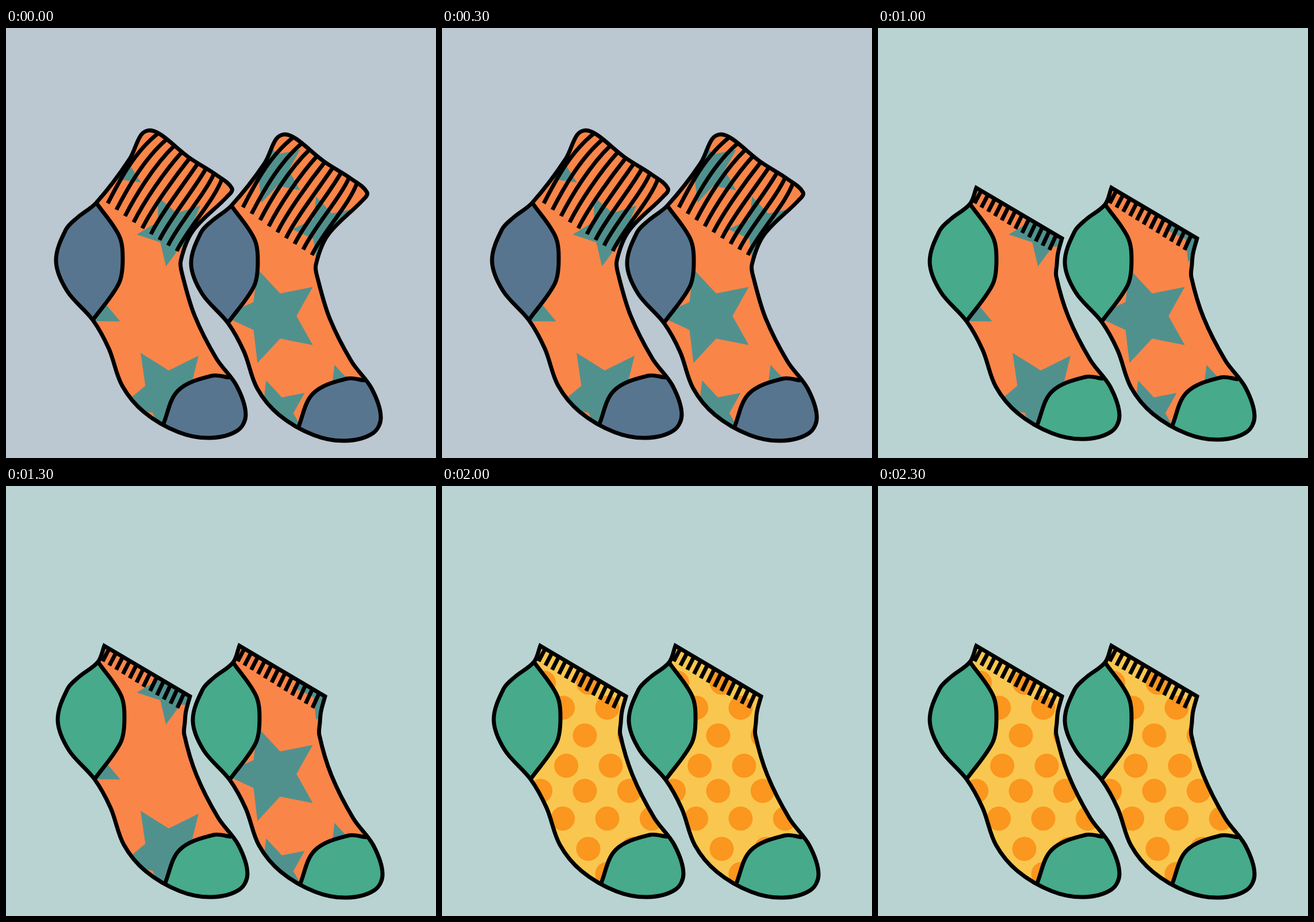
An HTML page with a canvas for the animation above (2500 ms loop, 748x748 px).

```html
<!DOCTYPE html>
<html lang="en">
<head>
<meta charset="utf-8">
<title>Socks</title>
<style>
html, body { margin: 0; height: 100%; overflow: hidden; }
canvas { display: block; }
</style>
</head>
<body>
<canvas id="stage" width="748" height="748"></canvas>
<script>
const ctx = document.getElementById('stage').getContext('2d');
const TAU = Math.PI * 2, RAD = Math.PI / 180;
const BLUE = '#58758f', ORANGE = '#fa8549', TEAL = '#50918e', MINT = '#46aa8b';
const CREAM = '#f3e9d8', GREEN = '#3f7c54', RED = '#ff6238', CRIMSON = '#b90b0d';

const mix = (a, b, u) => a + (b - a) * u;
const points = text => text.split(' ').map(p => p.split(',').map(Number));
const shift = (list, dx, dy) => list.map(([x, y]) => [x + dx, y + dy]);

// Smooth curve through points; a doubled point makes a sharp corner.
function spline(list, closed) {
  const path = new Path2D(), n = list.length;
  const at = i => closed ? list[(i + n) % n] : list[Math.max(0, Math.min(n - 1, i))];
  const tangent = (i, len) => {
    const [ax, ay] = at(i - 1), [bx, by] = at(i + 1);
    const k = len / 3 / (Math.hypot(bx - ax, by - ay) || 1);
    return [(bx - ax) * k, (by - ay) * k];
  };
  path.moveTo(...list[0]);
  for (let i = 0; i < (closed ? n : n - 1); i++) {
    const [x, y] = at(i), [u, v] = at(i + 1), len = Math.hypot(u - x, v - y);
    const a = tangent(i, len), b = tangent(i + 1, len);
    path.bezierCurveTo(x + a[0], y + a[1], u - b[0], v - b[1], u, v);
  }
  if (closed) path.closePath();
  return path;
}

// ---- Sock shapes ----
const foot = points('157,304 124,330 104,351 87,405 106,457 151,508 179,558 202,622 240,668 300,703 355,713 403,700 417,672 401,622 366,575 328,500 307,430');
const heel = points('157,304 197,362 203,405 196,445 151,508');
const toe = points('273,691 299,631 358,605 389,608');

// Ribs run from the top edge to a lower edge: [first end, last end, sag].
// lean: sideways pull at top and bottom, for the first and last rib.
const cuffs = {
  mid: {
    top: points('304,405 325,353 385,293 393,279 365,255 318,225 270,186 250,178 235,186 215,228'),
    footShift: [0, 0], rightDrop: [7, 5], ribs: 9,
    from: [[265, 183], [376, 261], 3], to: [[177, 305], [297, 388], 2],
    lean: [[44, 11], [18, 16]]
  },
  tall: {
    top: points('303,402 307,370 334,300 352,237 398,162 428,103 387,77 345,69 258,40 232,35 220,44 196,165 162,270'),
    footShift: [0, 0], rightDrop: [0, 5], ribs: 10,
    from: [[245, 37], [408, 84], 4], to: [[171, 277], [305, 344], -9],
    lean: [[18, 28], [2, 18]]
  },
  short: {
    top: points('311,412 313,392 320,366 320,366 171,278 171,278'),
    footShift: [3, 2], rightDrop: [0, 1], ribs: 12,
    from: [[179, 284], [309, 362], 0], to: [[168, 305], [298, 386], 0],
    lean: [[3, 3], [3, 3]]
  }
};

function addRibs({ ribs, from, to, lean }) {
  const along = ([a, b, sag], u) => [mix(a[0], b[0], u), mix(a[1], b[1], u) + sag * 4 * u * (1 - u)];
  for (let i = 0; i < ribs; i++) {
    const u = i / (ribs - 1), [x, y] = along(from, u), [p, q] = along(to, u);
    const pull = (q - y) * .28;
    ctx.moveTo(x, y);
    ctx.bezierCurveTo(x - mix(...lean[0], u), y + pull, p + mix(...lean[1], u), q - pull, p, q);
  }
}

function drawSock(look, isRight) {
  const cuff = cuffs[look.cuff], dx = isRight ? 235 : 0;
  const [topDy, footDy] = isRight ? cuff.rightDrop : [0, 0];
  const place = list => shift(list, dx + cuff.footShift[0], footDy + cuff.footShift[1]);
  const body = spline([...place(foot), ...shift(cuff.top, dx, topDy)], true);
  const heelArc = spline(place(heel)), toeArc = spline(place(toe));

  ctx.save();
  ctx.clip(body);
  ctx.fillStyle = look.fabric;
  ctx.fillRect(0, 0, 748, 748);
  look.pattern();
  ctx.fillStyle = look.patch;
  const heelArea = new Path2D(heelArc), toeArea = new Path2D(toeArc);
  heelArea.lineTo(60 + dx, 520);
  heelArea.lineTo(60 + dx, 300);
  toeArea.lineTo(450 + dx, 610);
  toeArea.lineTo(450 + dx, 740);
  toeArea.lineTo(273 + dx, 740);
  ctx.fill(heelArea);
  ctx.fill(toeArea);
  ctx.restore();

  ctx.strokeStyle = '#000';
  ctx.lineWidth = 7;
  for (const path of [body, heelArc, toeArc]) ctx.stroke(path);
  at(dx, topDy, 0, () => {
    ctx.beginPath();
    addRibs(cuff);
    ctx.stroke();
  });
}

// ---- Drawing helpers ----
function at(x, y, angle, draw) {
  ctx.save();
  ctx.translate(x, y);
  ctx.rotate(angle * RAD);
  draw();
  ctx.restore();
}
function around(x, y, count, first, draw) {
  for (let i = 0; i < count; i++) at(x, y, first + i * 360 / count, () => draw(i));
}
function dot(x, y, r, color) {
  ctx.fillStyle = color;
  ctx.beginPath();
  ctx.arc(x, y, r, 0, TAU);
  ctx.fill();
}
function line(d, color, width = 2) {
  ctx.strokeStyle = color;
  ctx.lineWidth = width;
  ctx.stroke(new Path2D(d));
}
function shape(d, color) {
  ctx.fillStyle = color;
  ctx.fill(new Path2D(d));
}
function starPath(x, y, R, angle) {
  ctx.beginPath();
  for (let i = 0; i < 10; i++) {
    const r = i % 2 ? R * .48 : R, a = (angle + i * 36) * RAD;
    ctx.lineTo(x + r * Math.cos(a), y + r * Math.sin(a));
  }
  ctx.closePath();
}
function leaf(x, y, angle, len, width, color) {
  at(x, y, angle, () => shape(`M0 0Q${len * .45} ${-width} ${len} 0Q${len * .45} ${width} 0 0`, color));
}

// ---- Fabrics ----
function bigStars() {
  const scatter = (places, R, tilt) => points(places).forEach(([x, y]) => {
    starPath(x, y, R, tilt(y));
    ctx.fillStyle = TEAL;
    ctx.fill();
  });
  const leftTilt = y => 40 - y * .03, rightTilt = () => 36;
  scatter('181,234 291,352 141,483', 64, leftTilt);
  scatter('281,637', 86, leftTilt);
  scatter('463,247 558,350 471,670 590,643', 60, rightTilt);
  scatter('464,501', 86, rightTilt);
}

function polkaDots() {
  for (let row = 0; row < 8; row++) {
    const sway = Math.cos(row * TAU / 3);
    for (let k = 0; k < 9; k++)
      dot(18.5 + row % 2 * 39 + k * 77.33 + sway * 4, 339 + row * 48.2 + sway * 3, 21, '#fb961e');
  }
}

function snowflake(x, y) {
  around(x, y, 8, 0, i => {
    const len = i % 2 ? 30 : 33;
    line(`M0 0H${len}`, CRIMSON, 2);
    for (let s = 8; s < len - 4; s += 8) line(`M${s + 6} -6L${s} 0L${s + 6} 6`, CRIMSON, 1.7);
  });
}
function outlineStar(x, y, R, width) {
  starPath(x, y, R, -90);
  ctx.lineWidth = width;
  ctx.strokeStyle = CRIMSON;
  ctx.stroke();
}
// Each row is the mirror image of the row above.
function winter() {
  for (let row = -4; row < 4; row++) {
    ctx.save();
    ctx.translate(247.5, 390 + row * 92.5);
    if (row % 2) ctx.scale(-1, 1);
    for (let x = -520; x < 600; x += 104) {
      snowflake(x - 18.5, 0);
      outlineStar(x - 18.5, -47, 7, 2);
      outlineStar(x + 30.5, -44, 17, 3.6);
      at(x + 33.5, 8, 0, () => shape('M0 -9L13 -13L14 -9L1 -5ZM2 -3L13 -7Q15 3 9 9Q3 13 -8 13Q-18 10 -15 3Q-9 0 -4 3Q3 3 2 -3Z', CRIMSON));
    }
    ctx.restore();
  }
}

function wreath() {
  ctx.strokeStyle = GREEN;
  ctx.lineWidth = 2;
  ctx.beginPath();
  ctx.arc(0, 0, 38, 0, TAU);
  ctx.stroke();
  around(0, 0, 12, 0, () => shape('M40 0L45 -6L48 -4L54 -6L54 -2L59 0L54 2L54 6L48 4L45 6Z', GREEN));
  around(0, 0, 12, 15, () => dot(38, 0, 2.6, RED));
  line('M0 -38V-18', GREEN);
  for (const side of [-1, 1])
    line(`M0 -18C${side * 8} -31 ${side * 17} -25 ${side * 11} -19Q${side * 6} -16 0 -18L${side * 8} -10`, GREEN);
  dot(0, 6, 18.5, RED);
  shape('M-4 -15H4V-10H-4Z', RED);
  around(0, 6, 6, 30, () => line('M0 0H12M8 -4L6 0L8 4', CREAM, 2.6));
}
// A stem with side leaves.
function frond(x, y, angle, len, size) {
  at(x, y, angle, () => {
    line(`M0 0Q${len / 2} -7 ${len} 0`, GREEN, 2);
    for (let s = 6; s < len; s += size * .8)
      for (const side of [-1, 1]) leaf(s, -3, side * 48, size, size * .5, GREEN);
    leaf(len - 2, 0, 0, size * .8, size * .5, GREEN);
  });
}
// A stem with paired twigs, each tipped with a berry.
function branch(x, y, angle, color, berry) {
  const twig = (s, turn, len) => at(s, 0, turn, () => {
    line(`M0 0Q${len / 2} ${-turn * .15} ${len} 0`, color, 2.4);
    dot(len, 0, 2.9, berry);
  });
  at(x, y, angle, () => {
    twig(0, 0, 96);
    for (const s of [30, 54]) {
      twig(s, -35, 60 - s * .4);
      twig(s, 35, 54 - s * .5);
    }
  });
}
function lobedLeaf() {
  leaf(-36, 14, -24, 80, 26, GREEN);
  for (let i = 0; i < 4; i++) {
    const x = -26 + i * 14, y = 9 - i * 6;
    leaf(x, y, -66, 23 - i, 11, GREEN);
    leaf(x, y, 14, 28 - i * 2, 11, GREEN);
    at(x, y, 0, () => line('M4 -13L0 0L14 1', CREAM, 1.8));
  }
  line('M-32 14L24 -13', CREAM, 2);
}
function poinsettia() {
  around(0, 0, 8, -105, i => leaf(0, 0, 0, 35, 20, [0, 1, 3].includes(i) ? GREEN : RED));
  dot(0, 0, 7.5, CREAM);
  around(0, 0, 5, 0, () => dot(4.5, 0, 1.7, GREEN));
}
function festiveTile() {
  at(226, 353, 0, wreath);
  branch(172, 432, 22, RED, GREEN);
  branch(272, 556, 30, GREEN, RED);
  frond(286, 461, -97, 62, 13);
  frond(398, 425, -122, 66, 22);
  frond(346, 497, -80, 36, 14);
  shape('M304 445Q288 432 293 423Q300 416 305 424Q312 417 317 425Q318 434 304 445Z', RED);
  at(215, 517, 0, lobedLeaf);
  at(302, 508, 0, poinsettia);
  dot(175, 500, 3.5, RED);
  dot(252, 534, 4, RED);
  line('M372 342Q378 364 412 355', RED);
}
function festive() {
  for (let i = -1; i < 2; i++)
    for (let j = -2; j < 2; j++) at(i * 256.5, j * 257, 0, festiveTile);
}

// ---- Show ----
const looks = [
  { back: '#bbc7d1', cuff: 'mid', fabric: ORANGE, patch: BLUE, pattern: bigStars },
  { back: '#fde7b9', cuff: 'tall', fabric: CREAM, patch: BLUE, pattern: festive },
  { back: '#b9d3d2', cuff: 'short', fabric: ORANGE, patch: MINT, pattern: bigStars },
  { back: '#fde7b9', cuff: 'tall', fabric: '#fff', patch: ORANGE, pattern: winter },
  { back: '#b9d3d2', cuff: 'short', fabric: '#f9c74f', patch: MINT, pattern: polkaDots }
];
const start = performance.now();
let shown = -1;

function tick() {
  const index = Math.floor((performance.now() - start) / 500) % looks.length;
  if (index !== shown) {
    shown = index;
    const look = looks[index];
    ctx.fillStyle = look.back;
    ctx.fillRect(0, 0, 748, 748);
    drawSock(look, false);
    drawSock(look, true);
  }
  requestAnimationFrame(tick);
}
tick();
</script>
</body>
</html>
```
